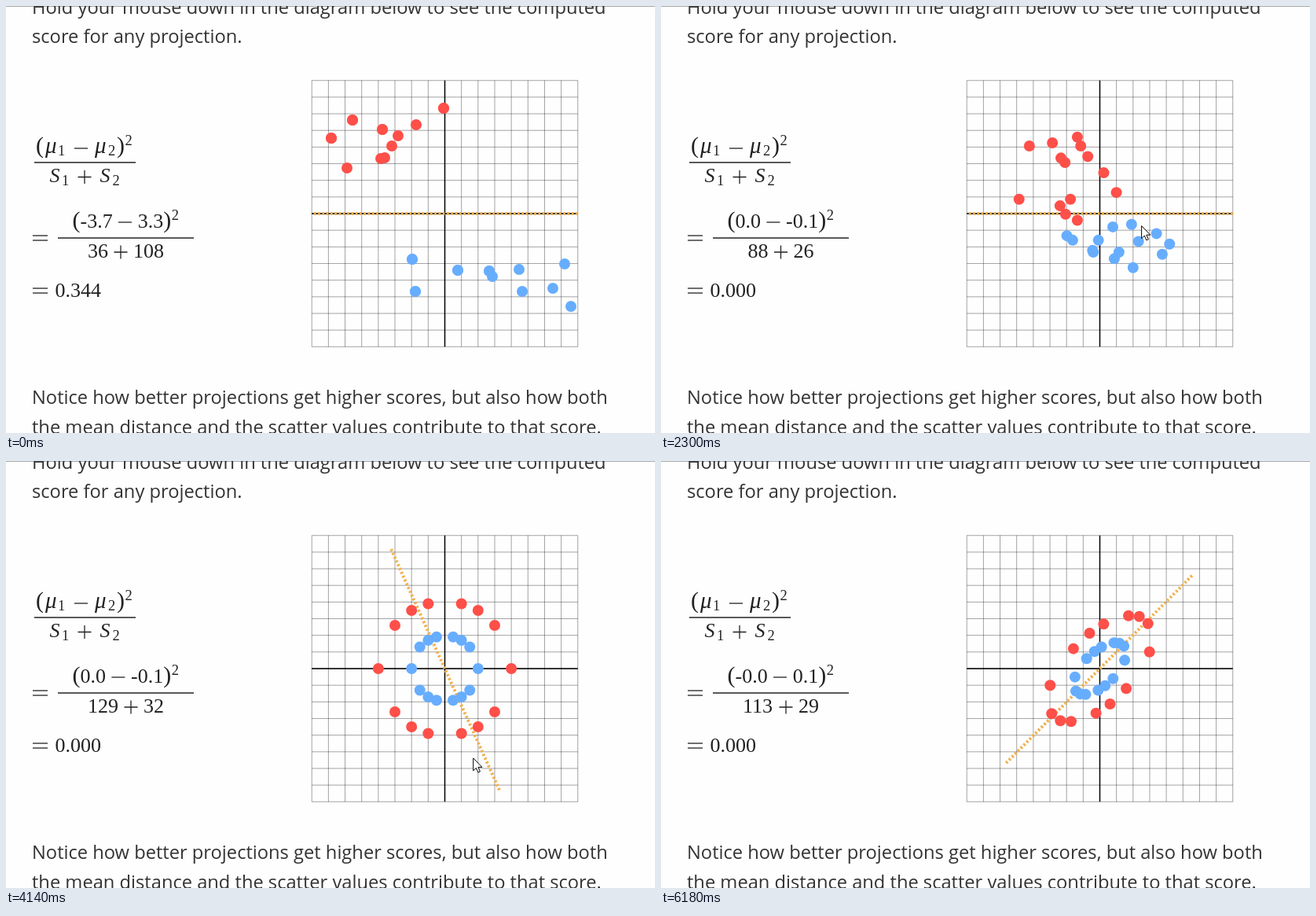
Write an HTML page that moves like this. It is 826 px wide and 543 px high and loops after 6220 ms.

```html
<!DOCTYPE html>
<html lang="en">
<head>
<meta charset="utf-8">
<title>Projection score</title>
<style>
  html, body { margin: 0; width: 100%; height: 100%; overflow: hidden; background: #fefefe; }
  svg { display: block; width: 826px; height: 543px; }
  .copy { font: 23.7px "Open Sans", "Noto Sans", sans-serif; fill: #333; }
  .math { font: 26px "Liberation Serif", serif; fill: #222; }
  .math .it { font-style: italic; }
  .math .mu { font-style: italic; font-size: 29px; }
  .math .par { font-size: 30px; }
  .math .small { font-size: 18.5px; }
  .math path { stroke: #222; stroke-width: 1.3; fill: none; }
  .red { fill: #fe4f49; }
  .blue { fill: #67adfe; }
</style>
</head>
<body>
<svg viewBox="0 0 826 543">
  <path d="M0 .5H826" stroke="#aaa"/>
  <g class="copy">
    <text x="33" y="9.5">Hold your mouse down in the diagram below to see the computed</text>
    <text x="33" y="47">score for any projection.</text>
  </g>
  <g class="copy" id="below">
    <text x="33" y="506">Notice how better projections get higher scores, but also how both</text>
    <text x="33" y="543.5">the mean distance and the scatter values contribute to that score.</text>
  </g>
  <rect id="zone" x="34.5" y="83" width="749" height="370.5" rx="17" fill="none"
        stroke="#f55a5a" stroke-width="2.8" stroke-linecap="round" stroke-dasharray="0 5"/>
  <g class="math" id="math"><g id="head"></g><g id="values"></g></g>
  <g id="plot">
    <path id="grid" stroke="#000" stroke-opacity=".36" fill="none"/>
    <path d="M-169.3 0H169.3M0-169.3V169.3" stroke="#000" stroke-width="1.5"/>
    <path id="line" d="M169.3 0H-169.3" stroke="#f0b252" stroke-width="4" stroke-dasharray="2.645"/>
    <g id="dots"></g>
  </g>
  <g id="tile">
    <path d="M2 128.500H128.500V4" fill="none" stroke="#000" stroke-opacity=".28" stroke-width="4"/>
    <rect width="127" height="29" fill="#fff" fill-opacity=".78"/>
    <rect y="29" width="127" height="101" fill="#e0f3fc" fill-opacity=".78"/>
  </g>
  <g id="tip">
    <rect x="14.500" y="18" width="70" height="23" fill="#fff" stroke="#777"/>
    <path d="M19 29.500H33M27 23.500L33 29.500L27 35.500" fill="none" stroke="#1a3fc4" stroke-width="1.3"/>
    <text x="39" y="35" font-family="Open Sans, sans-serif" font-size="14" fill="#1a2fa8">Move</text>
  </g>
  <path id="arrow" d="M.5.5V16.500L4.200 13L6.700 18.700L9.200 17.600L6.700 12H11.700Z" fill="#fff" stroke="#000"/>
  <path id="beam" d="M0 .5H2.500L3.500 1.500L4.500.5H7M3.500 1V15M0 15.500H2.500L3.500 14.500L4.500 15.500H7" fill="none" stroke="#000"/>
</svg>
<script>
const LOOP = 6220, UNIT = 21.16, CX = 558.5, CY = 264;
const $ = id => document.getElementById(id);
const show = (id, on) => $(id).style.display = on ? '' : 'none';
const move = (id, x, y, rest = '') => $(id).setAttribute('transform', `translate(${x} ${y})${rest}`);
const clamp = v => Math.max(0, Math.min(1, v));
const swing = v => .5 - Math.cos(Math.PI * clamp(v)) / 2;

// Keyframes: [time, value, value...], linear between
function track(keys, t) {
  if (t <= keys[0][0]) return keys[0].slice(1);
  for (let i = 1; i < keys.length; i++) {
    const [a, b] = [keys[i - 1], keys[i]];
    if (t < b[0]) {
      const k = (t - a[0]) / (b[0] - a[0]);
      return a.slice(1).map((v, j) => v + (b[j + 1] - v) * k);
    }
  }
  return keys[keys.length - 1].slice(1);
}

const ANGLE = [[2950, 0], [3250, 2.4], [3600, 23], [3790, 35.6], [4260, 76], [4330, 80],
  [4590, 91.2], [4950, 113], [5220, 128.4], [5320, 134.8]];
const POINTER = [[1990, 553, 298], [2600, 667, 261], [2750, 673, 280], [2980, 674, 276],
  [3250, 677, 278], [3600, 653, 317], [3790, 642, 346], [4260, 578, 388], [4590, 545, 386],
  [4950, 500, 374], [5220, 471, 356], [5320, 461, 346], [5590, 631, 527]];

// Point sets
const toUnits = list => list.map(([x, y]) => [(x - CX) / UNIT, (CY - y) / UNIT]);
const redStart = toUnits([[557, 130], [441, 145], [414, 168], [479, 157], [499, 165],
  [522, 151], [491, 178], [434, 206], [477, 194], [482, 193]]);
const blueStart = toUnits([[517, 322], [521, 363], [575, 336], [615, 337], [619, 344],
  [653, 335], [657, 363], [696, 359], [711, 328], [719, 382]]);
function ring(r) {
  const pts = [];
  for (const k of [-4, -3, -2, -1, 1, 2, 3, 4]) {
    const x = k * r / 4, y = +Math.sqrt(r * r - x * x).toFixed(1);
    pts.push([x, y]);
    if (y) pts.push([x, -y]);
  }
  return pts;
}
const dots = [];
function addDots(cls, from, to) {
  to.forEach((end, i) => {
    const el = document.createElementNS('http://www.w3.org/2000/svg', 'circle');
    el.setAttribute('r', 7);
    el.setAttribute('class', cls);
    $('dots').append(el);
    dots.push({ el, start: from[i % from.length], end });
  });
}
addDots('red', redStart, ring(4));
addDots('blue', blueStart, ring(2));

let grid = '';
for (let i = -8; i <= 8; i++) grid += `M-169.3 ${i * UNIT}H169.3M${i * UNIT}-169.3V169.3`;
$('grid').setAttribute('d', grid);

// Formula pieces
const text = (x, y, s, cls = '') => `<text x="${x}" y="${y}" class="${cls}">${s}</text>`;
const bar = (x, y, w) => `<path d="M${x} ${y}h${w}"/>`;
const plus = (x, y) => `<path d="M${x} ${y}h17m-8.500-8.500v17"/>`;
const equals = y => bar(34, y - 3, 19) + bar(34, y + 3, 19);
const width = s => 26 * [...s].reduce((w, c) => w + (c === '.' ? .25 : c === '-' ? .333 : .5), 0);

$('head').innerHTML = text(38, 187, '(', 'par') + text(50, 187, 'μ', 'mu') + text(66, 190, '1', 'small') +
  bar(87, 181, 17) + text(113, 187, 'μ', 'mu') + text(130, 190, '2', 'small') +
  text(141, 187, ')', 'par') + text(151.500, 177, '2', 'small') + bar(36, 199, 129) +
  text(55.500, 224, 'S', 'it') + text(71, 228, '1', 'small') + plus(91.500, 217.500) +
  text(119.500, 224, 'S', 'it') + text(135.500, 228, '2', 'small');

let shown = '';
function setValues(m1, m2, s1, s2, score) {
  const key = [m1, m2, s1, s2, score].join();
  if (key === shown) return;
  shown = key;
  const a = width(m1), b = width(m2);
  const x = 152.5 - (a + b + 62.4) / 2, x2 = x + 10 + a + 32;
  const d = 152.5 - (width(s1) + width(s2) + 32) / 2;
  $('values').innerHTML = equals(295) + bar(66, 295, 173) +
    text(x, 282, '(', 'par') + text(x + 10, 282, m1) + bar(x + 17.4 + a, 275, 17) +
    text(x2, 282, m2) + text(x2 + b, 282, ')', 'par') + text(x2 + b + 10.5, 272, '2', 'small') +
    text(d, 320, s1) + plus(d + width(s1) + 7.5, 313) + text(d + width(s1) + 32, 320, s2) +
    equals(362) + text(62.5, 370, score);
}

function updateValues(t, deg) {
  if (t < 1990) return setValues('-3.7', '3.3', '36', '108', '0.344');
  const c = Math.cos(deg * Math.PI / 180), q = 1 - c * c;
  const mean = -2 / 15 * c, s1 = 88 + 48.88 * q, s2 = 25.73 + 7.03 * q;
  setValues(deg < 100 ? '0.0' : '-0.0', mean.toFixed(1), s1.toFixed(0), s2.toFixed(0),
    (mean * mean / (s1 + s2)).toFixed(3));
}

function draw(t) {
  const [deg] = track(ANGLE, t);
  let [px, py] = track(POINTER, t);
  const dragging = t >= 1030 && t < 1850;
  if (dragging) {
    const k = (1 - clamp((t - 1000) / 490)) ** 2;
    px = 553 + 237 * k;
    py = 298 + 322 * k;
  }
  const over = t >= 1030 && t < 1990 && px < 785 && py < 454;

  show('zone', over);
  move('below', 0, over ? 3 : 0);
  move('math', over ? 2.5 : 0, over ? 1.8 : 0);
  if (over) move('plot', 558, 265, ' scale(.992)');
  else move('plot', CX, CY);

  show('tile', dragging);
  show('tip', dragging && over);
  move('tile', px - 64, py - 115);
  move('tip', px, py);
  const onText = !dragging && py > 485;
  show('arrow', t >= 1030 && t < 5655 && !onText);
  show('beam', t < 5655 && onText);
  move('arrow', px, py);
  move('beam', px, py);

  $('line').setAttribute('transform', `rotate(${deg})`);
  updateValues(t, deg);

  const morph = swing((t - 1980) / 630), flat = swing((t - 5830) / 700);
  const ux = Math.cos(deg * Math.PI / 180), uy = -Math.sin(deg * Math.PI / 180);
  for (const { el, start, end } of dots) {
    let x = start[0] + (end[0] - start[0]) * morph;
    let y = start[1] + (end[1] - start[1]) * morph;
    const p = x * ux + y * uy;
    x += (p * ux - x) * flat;
    y += (p * uy - y) * flat;
    el.setAttribute('cx', x * UNIT);
    el.setAttribute('cy', -y * UNIT);
  }
}

function tick() {
  draw(performance.now() % LOOP);
  requestAnimationFrame(tick);
}
tick();
</script>
</body>
</html>
```
